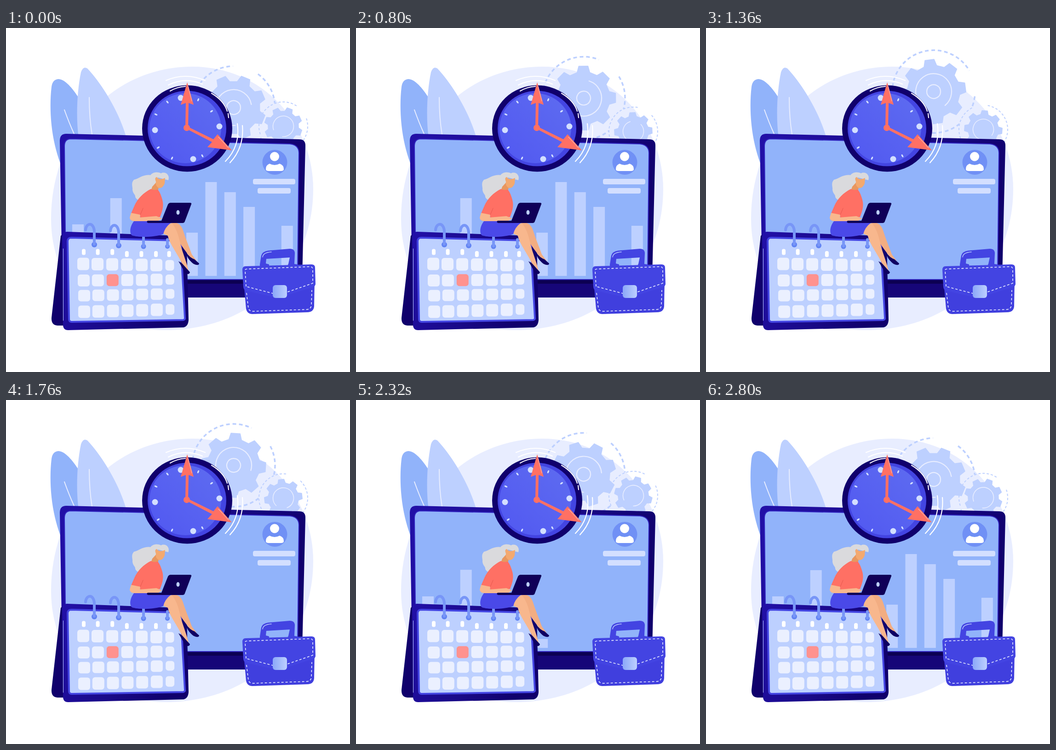
These frames come from a looping animation (748x748 px, 2880 ms). An HTML page:

```html
<!DOCTYPE html>
<html>
<head>
<meta charset="utf-8">
<style>
html, body { margin: 0; width: 100%; height: 100%; overflow: hidden; background: #fff }
svg { display: block; width: 100vw; height: 100vh }
.line { fill: none; stroke-linecap: round; stroke-linejoin: round }
.stitch { fill: none; stroke: #e8edff; stroke-width: 1.6; stroke-dasharray: 5 4 }
</style>
</head>
<body>
<svg viewBox="0 0 748 748">
  <defs>
    <linearGradient id="frame" x2="1" y2=".3">
      <stop stop-color="#2210a8"/><stop offset=".6" stop-color="#190988"/><stop offset="1" stop-color="#10006c"/>
    </linearGradient>
    <linearGradient id="face" x1="0" y1="1" x2="1" y2="0">
      <stop stop-color="#5158f1"/><stop offset="1" stop-color="#5e6cf0"/>
    </linearGradient>
    <linearGradient id="buckle">
      <stop stop-color="#8ba8f8"/><stop offset="1" stop-color="#bdd0ff"/>
    </linearGradient>
    <mask id="outside" maskUnits="userSpaceOnUse" x="0" y="0" width="748" height="748">
      <rect width="748" height="748" fill="#fff"/>
      <circle id="hole" cx="603" r="54"/>
    </mask>
  </defs>

  <path fill="#e8edff" d="M405 84C560 84 668 210 668 350C668 530 530 657 345 657C200 657 98 560 98 415C98 230 230 84 405 84"/>

  <!-- leaves -->
  <path fill="#91b3fa" d="M118 294C96 235 94 170 99 128Q101 112 114 111C132 112 150 140 157 150L162 240H125Z"/>
  <path fill="#bdd0ff" d="M158 240C152 195 154 140 163 96Q168 82 177 88C206 118 245 180 261 236Z"/>
  <path class="line" stroke="#e8edff" stroke-width="2" d="M127 178Q137 206 148 230M181 151Q181 195 187 231"/>

  <!-- gears -->
  <g mask="url(#outside)"><g id="bigDash"></g></g>
  <g id="bigGear"></g>
  <g id="smallGear"></g>

  <!-- monitor -->
  <path fill="url(#frame)" d="M131 230L637 242Q652 242 651 257L643 586H123L117 245Q117 230 131 230"/>
  <path fill="#160678" d="M380 548H643V586H380Z"/>
  <path fill="#0c0052" d="M380 548H643V556H380Z"/>
  <path fill="#91b3fa" stroke="#2f22bd" stroke-width="2" d="M141 241L617 252Q638 254 637 274L634 547H130L127 257Q127 241 141 241"/>
  <g id="bars" fill="#bdd0ff"></g>
  <circle cx="584.500" cy="292" r="27" fill="#7090f5"/>
  <g fill="#fff">
    <circle cx="584" cy="279.500" r="10"/>
    <path d="M573 295Q584 301 595 295Q604 298 604 307Q604 311 598 311H571Q565 311 565 307Q565 298 573 295"/>
  </g>
  <g fill="#d3dfff">
    <rect x="537" y="328" width="92" height="12" rx="4"/>
    <rect x="547" y="348" width="72" height="12" rx="4"/>
  </g>

  <!-- clock -->
  <ellipse cx="394" cy="218.500" rx="98" ry="94" fill="#10006c"/>
  <ellipse cx="393.500" cy="218.500" rx="85.500" ry="82" fill="#4345e2"/>
  <ellipse cx="390" cy="218" rx="78" ry="76" fill="url(#face)"/>
  <g id="ticks" fill="#d3dfff"></g>
  <g class="line" stroke="#fff" stroke-width="2.200">
    <path d="M348 114Q390 96 433 114M353 124Q390 106 427 122M357 137Q372 128 390 127M447 142Q474 158 481 181M483 186L484 195"/>
    <path d="M503 208Q510 257 477 290M514 212Q518 260 487 293"/>
  </g>
  <g fill="#ff7064">
    <path d="M394 118L408 167L397 163L396 217H390L391 163L380 167Z"/>
    <path d="M491 266L438 259L448 248L392 219L394 214L451 242L460 231Z"/>
    <circle cx="393" cy="217" r="7"/>
  </g>
  <path class="line" stroke="#ffb0a5" stroke-width="1.200" d="M396 127L404 159M484 261L462 237"/>

  <!-- calendar -->
  <path fill="#10006c" d="M119 452Q121 449 128 449L131 647H112Q98 646 99 630Z"/>
  <path fill="url(#frame)" d="M133 443L380 452Q392 455 393 470L397 635Q396 649 386 651L135 657Q124 657 124 645L122 455Q122 443 133 443"/>
  <path class="line" stroke="#bdd0ff" d="M124.500 480V636"/>
  <path fill="#bdd0ff" stroke="#4345e2" stroke-width="4" d="M142 456L370 462Q379 463 380 471L389 630Q390 634 385 635L143 639Q137 639 137 633L134 464Q134 456 142 456"/>
  <g id="cells"></g>
  <g fill="#6284f3"><circle cx="192" cy="471" r="6"/><circle cx="245" cy="473" r="6"/><circle cx="299" cy="475" r="5.500"/><circle cx="351" cy="475" r="5"/></g>
  <path class="line" stroke="#7896f7" stroke-width="6" d="M173 439C174 424 190 421 192 441V470M227 441C228 426 243 423 245 444V472M299 452V474M351 460V474"/>

  <!-- woman -->
  <path fill="#f2ad82" d="M352 428C368 418 380 425 385 440C392 462 399 478 404 492L414 506L405 507C396 490 378 472 368 450Z"/>
  <path fill="#0f0062" d="M391 487Q400 500 410 503L420 512Q419 518 408 513Q394 503 391 487"/>
  <path fill="#f8b78d" d="M342 447C345 432 352 424 362 426C373 440 376 456 382 480L393 513L397 527L385 519C380 500 355 470 352 452Z"/>
  <path fill="#0f0062" d="M375 507L383 512L400 531Q398 538 390 533Z"/>
  <path fill="#4a49e8" d="M281 417C270 428 267 445 274 451C290 456 325 455 342 448Q345 434 358 424Z"/>
  <path fill="#dadadd" d="M353 331C357 320 347 311 337 316C330 312 319 313 314 320C300 317 288 328 278 330C271 338 276 345 275 352C276 360 282 363 281 367C284 375 292 376 296 372C304 366 306 357 316 352C327 345 329 335 330 325Z"/>
  <path fill="#e8975f" d="M318 345L330 332L332 347L330 355L315 354Z"/>
  <path fill="#f3a970" d="M328 324Q333 332 346 326L345 338Q341 349 332 348Q324 343 326 334Q322 325 328 324"/>
  <path fill="#ff7064" d="M315 350C300 357 285 372 279 387L272 403L291 408L292 413L335 411C341 395 344 385 339 370C336 360 333 354 329 351Q322 354 315 350"/>
  <path fill="#f8b78d" d="M272 402L269 412Q269 419 279 420L330 420L339 414L327 409L291 412L292 406Z"/>
  <path class="line" stroke="#e8584f" d="M292 406L298 392"/>
  <path fill="#0f0058" d="M308 419H338L352 384Q354 380 358 380H400Q404 380 403 383L389 420Q388 424 384 424H309Q304 422 308 419"/>
  <ellipse cx="374" cy="401" rx="3.500" ry="5" fill="#bdd0ff"/>

  <!-- briefcase -->
  <path fill="#4344e2" fill-rule="evenodd" d="M552 514L555 495Q557 486 570 484L617 480Q628 480 628 490L627 513L634 514V519H611L614 513L617 499L566 502L565 512L572 514V519H552Z"/>
  <path fill="#403fde" d="M517 555L522 610Q524 622 536 622L657 618Q669 617 670 605L671 550Z"/>
  <path fill="#4344e2" d="M521 518L664 514Q672 514 672 521L673 557Q672 562 668 563L612 581Q596 588 580 585L522 571Q516 569 516 562L514 526Q514 518 521 518"/>
  <path class="stitch" d="M522 562L520 527Q520 524 524 524L661 519Q667 519 667 525V555L612 574Q596 580 580 577L522 562"/>
  <path class="stitch" d="M523 576L527 609Q529 616 537 616L655 612Q663 611 664 603L665 570"/>
  <rect x="580" y="559" width="31" height="28" rx="6" fill="url(#buckle)"/>
  <path class="line" stroke="#bdd0ff" stroke-width="1.500" d="M558 498Q559 488 577 487"/>
</svg>

<script>
const LOOP = 2880, STEP = 80, TAU = Math.PI * 2;
const BASE = 539, BAR_MS = 300, LEAVE = 486, RETURN = 1912;
const $ = id => document.getElementById(id);
const point = (r, deg) => {
  const a = deg * TAU / 360;
  return (r * Math.cos(a)).toFixed(2) + ' ' + (r * Math.sin(a)).toFixed(2);
};
const arc = (r, from, to) =>
  `M${point(r, from)}A${r} ${r} 0 ${to - from > 180 ? 1 : 0} 1 ${point(r, to)}`;

function gearBody(teeth, outer, root, phase) {
  const corners = [[root, -.31], [outer, -.18], [outer, .18], [root, .31]];
  const pts = [];
  for (let i = 0; i < teeth; i++)
    for (const [r, offset] of corners) pts.push(point(r, phase + (i + offset) * 360 / teeth));
  return `<path fill="#bdd0ff" stroke="#bdd0ff" stroke-width="2" stroke-linejoin="round" d="M${pts.join('L')}Z"/>`;
}
const dashes = (r, start, width, pattern) =>
  `<path fill="none" stroke="#bdd0ff" stroke-width="${width}" stroke-dasharray="${pattern}"
    d="${arc(r, start, start + 143)}${arc(r, start + 180, start + 323)}"/>`;
const ring = (d, width) => `<path class="line" stroke="#e8edff" stroke-width="${width}" d="${d}"/>`;

$('bigDash').innerHTML = dashes(90, -54, 3.5, '8 6');
$('bigGear').innerHTML = gearBody(8, 70, 57, 22) +
  ring(arc(39, 85, 350), 2.2) + ring(arc(15, 0, 359.9), 2.2);
$('smallGear').innerHTML = dashes(53, -19, 2, '5 4') + gearBody(8, 41, 33, 20) +
  ring(arc(22.5, -200, 95), 1.6);

// dots at the quarters, short strokes between them
$('ticks').innerHTML =
  [[380, 152], [464, 214], [407, 285], [324, 222]]
    .map(([x, y]) => `<circle cx="${x}" cy="${y}" r="6.500"/>`).join('') +
  [[351, 161], [418, 156], [447, 181], [326, 188], [331, 260], [361, 283], [427, 278]]
    .map(([x, y]) => {
      const turn = Math.atan2(y - 218, x - 393) * 360 / TAU;
      return `<ellipse rx="3.500" ry="1.700" transform="translate(${x} ${y}) rotate(${turn})"/>`;
    }).join('');

const box = (x, y, w, h, r, fill) =>
  `<rect x="${x - w / 2}" y="${y - h / 2}" width="${w}" height="${h}" rx="${r}" fill="${fill}"/>`;
const columns = [168, 199, 231, 263, 295, 327, 356];
const rows = [[513, 3, 27, 0], [549, -2, 26, 1], [582, -4, 25, 2], [617, -5, 27, 2]];
$('cells').innerHTML = columns.map((x, i) =>
  box(x + 1 - i * .4, i < 3 ? 487 : 491.5, 8, 13, 3.5, '#fff') +
  rows.map(([y, drift, h, shift], j) =>
    box(x + shift * (1 - i / 9), y + drift * i / 6, i == 6 ? 19 : 26, i == 6 ? h - 4 : h, 6,
      i == 2 && j == 1 ? '#ff928e' : '#ebf0ff')).join('')).join('');

// column, top, delay
const bars = [
  [0, 427, 0], [2, 370, 125], [4, 385, 260], [6, 445, 394],
  [7, 335, 443], [8, 357, 490], [9, 389, 536], [11, 430, 583]
].map(([column, top, delay]) => {
  const rect = document.createElementNS('http://www.w3.org/2000/svg', 'rect');
  rect.setAttribute('x', 144 + column * 41.35);
  rect.setAttribute('width', 25);
  $('bars').append(rect);
  return { rect, full: BASE - top, delay };
});

const clamp = u => Math.min(1, Math.max(0, u));
const backIn = u => 2.70158 * u ** 3 - 1.70158 * u ** 2;

// cubic-bezier(.45, 0, 0, 1)
function spin(u) {
  let low = 0, high = 1;
  for (let i = 0; i < 24; i++) {
    const s = (low + high) / 2;
    if (1.35 * s * (1 - s) ** 2 + s ** 3 < u) low = s; else high = s;
  }
  return low * low * (3 - 2 * low);
}
const place = (id, x, y, turn) =>
  $(id).setAttribute('transform', `translate(${x} ${y}) rotate(${turn})`);

function draw(t) {
  const turn = 360 * spin(t / LOOP);
  const bigY = 155.5 + 17.5 * Math.cos(TAU * t / LOOP);
  const smallY = 216.5 + 8.5 * Math.cos(TAU * (t - 870) / LOOP);
  place('bigDash', 495, bigY, -turn);
  place('bigGear', 495, bigY, -turn);
  place('smallGear', 603, smallY, turn);
  $('hole').setAttribute('cy', smallY);
  for (const { rect, full, delay } of bars) {
    const leaving = clamp((t - LEAVE - delay) / BAR_MS);
    const returning = clamp((t - RETURN - delay) / BAR_MS);
    const scale = 1 - backIn(returning > 0 ? 1 - returning : leaving);
    const height = Math.max(0, full * scale);
    rect.setAttribute('y', BASE - height);
    rect.setAttribute('height', height);
  }
}

const start = performance.now();
function tick() {
  const t = (performance.now() - start) % LOOP;
  draw(Math.floor(t / STEP) * STEP);
  requestAnimationFrame(tick);
}
tick();
</script>
</body>
</html>
```
